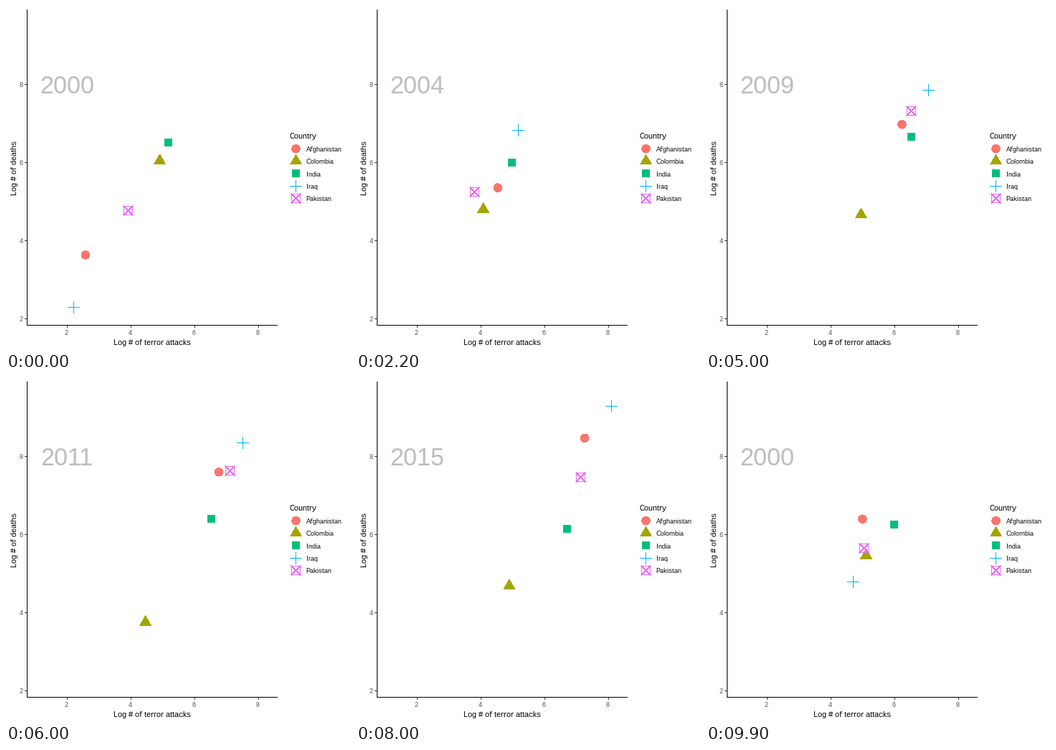
A matplotlib script that plays this animation: 480x480 px, repeating every 10000 ms.

```python
import math

import matplotlib.pyplot as plt
import numpy as np
from matplotlib.animation import FuncAnimation
from matplotlib.patches import PathPatch
from matplotlib.path import Path

SIZE, DPI = 480, 100
FRAMES, INTERVAL = 100, 100
PX = 72 / DPI  # points per pixel
FIRST_YEAR, YEARS = 2000, 19

plt.rcParams.update({
    "font.family": "Liberation Sans",
    "text.hinting": "default",
    "text.hinting_factor": 1,
})

COLORS = {
    "Afghanistan": "#F8766D",
    "Colombia": "#A3A500",
    "India": "#00BF7D",
    "Iraq": "#00B0F6",
    "Pakistan": "#E76BF3",
}

# Turning points: years since the first, log attacks, log deaths
ROUTES = {
    "Afghanistan": [(0, 2.57, 3.63), (3.5, 4.52, 5.35), (5.5, 5.35, 6.25),
                    (9, 6.22, 6.97), (13, 7.28, 8.22), (17, 7.21, 8.71),
                    (18, 7.4, 9.16)],
    "Colombia": [(0, 4.9, 6.04), (3.5, 4.07, 4.8), (5.5, 3.76, 4.66),
                 (7, 3.64, 4.16), (9, 4.94, 4.66), (11, 4.45, 3.75),
                 (13, 4.99, 4.93), (17, 4.78, 4.43), (18, 5.3, 4.88)],
    "India": [(0, 5.17, 6.51), (3.5, 4.965, 5.99), (5.5, 5.03, 6.36),
              (9, 6.52, 6.65), (13, 6.52, 6.15), (17, 6.86, 6.143),
              (18, 6.78, 6)],
    "Iraq": [(0, 2.2, 2.29), (1, 1.1, 2.19), (3.5, 5.16, 6.82),
             (5.5, 6.55, 8.27), (9, 7.05, 7.84), (13, 7.94, 8.86),
             (14, 8.24, 9.53), (17, 7.79, 8.78), (18, 7.18, 7.26)],
    "Pakistan": [(0, 3.91, 4.76), (3.5, 3.79, 5.24), (5.5, 4.74, 5.38),
                 (9, 6.52, 7.31), (13, 7.69, 7.96), (17, 6.57, 6.98),
                 (18, 6.15, 6.55)],
}


def to_x(v):
    return 85.4 + 44.55 * (v - 2)


def to_y(v):
    return 436.2 - 54.5 * (v - 2)


def mid_pixel(v):
    return math.floor(v) + 0.5


def strokes(*lines):
    return Path.make_compound_path(*[Path(line) for line in lines])


def box(h):
    return [(-h, -h), (h, -h), (h, h), (-h, h), (-h, -h)]


R = 5.69
CIRCLE = Path.unit_circle()
SHAPES = {
    "Afghanistan": Path(CIRCLE.vertices * R, CIRCLE.codes),
    "Colombia": Path([(0, -1.555 * R), (1.347 * R, 0.778 * R),
                      (-1.347 * R, 0.778 * R), (0, -1.555 * R)]),
    "India": Path(box(R)),
    "Iraq": strokes([(-8, 0), (8, 0)], [(0, -8), (0, 8)]),
    "Pakistan": strokes(box(6), [(-6, -6), (6, 6)], [(-6, 6), (6, -6)]),
}
OUTLINED = ("Iraq", "Pakistan")


def placed(name, x, y):
    if name in OUTLINED:
        x, y = mid_pixel(x), mid_pixel(y)
    shape = SHAPES[name]
    return Path(shape.vertices + (x, y), shape.codes)


def add_marker(name, x, y):
    if name in OUTLINED:
        style = dict(fill=False, edgecolor=COLORS[name], linewidth=PX,
                     capstyle="projecting", joinstyle="miter")
    else:
        style = dict(facecolor=COLORS[name], linewidth=0)
    return ax.add_patch(PathPatch(placed(name, x, y), zorder=3,
                                  antialiased=False,
                                  snap=name == "India", **style))


def write(x, y, text, size, color="black", **kw):
    return ax.text(x, y, text, fontsize=size * PX, color=color,
                   va="baseline", **kw)


def rule(xs, ys, color):
    ax.plot(xs, ys, color=color, lw=PX, solid_capstyle="butt",
            snap=False, zorder=1)


fig = plt.figure(figsize=(SIZE / DPI, SIZE / DPI), dpi=DPI, facecolor="white")
ax = fig.add_axes([0, 0, 1, 1])
ax.set_xlim(0, SIZE)
ax.set_ylim(SIZE, 0)
ax.axis("off")

# Axes
rule([29.5, 29.5], [5, 446], "black")
rule([29, 379], [445.5, 445.5], "black")
for v in (2, 4, 6, 8):
    tx, ty = mid_pixel(to_x(v)), mid_pixel(to_y(v))
    rule([tx, tx], [446, 449], "#333333")
    rule([26, 29], [ty, ty], "#333333")
    write(tx - 1, 459, str(v), 9, "#4D4D4D", ha="center")
    write(24, ty + 3.5, str(v), 9, "#4D4D4D", ha="right")
write(204, 473, "Log # of terror attacks", 11, ha="center")
write(15, 226, "Log # of deaths", 11, ha="center",
      rotation=90, rotation_mode="anchor")

# Legend
write(396, 185, "Country", 11)
for i, name in enumerate(COLORS):
    y = 199.2 + 17.28 * i
    add_marker(name, 404.6, y)
    write(418.5, round(y + 4), name, 9)

year_text = write(85, 122, "", 35, "#BEBEBE", ha="center", zorder=2)
points = {name: add_marker(name, 0, 0) for name in COLORS}

# Each year holds, then one halfway step leads to the next
STARTS = [5 * i + min(max(i - 1, 0), 5) for i in range(YEARS)] + [FRAMES]


def update(frame):
    now = int(np.searchsorted(STARTS, frame, side="right")) - 1
    halfway = frame == STARTS[now + 1] - 1
    t = now + 0.5 * halfway
    year_text.set_text(str(FIRST_YEAR + (now + halfway) % YEARS))
    for name, point in points.items():
        years, attacks, deaths = zip(*ROUTES[name])
        x = to_x(np.interp(t, years, attacks, period=YEARS))
        y = to_y(np.interp(t, years, deaths, period=YEARS))
        point.set_path(placed(name, x, y))
    return [year_text, *points.values()]


anim = FuncAnimation(fig, update, frames=FRAMES, interval=INTERVAL,
                     repeat=True, repeat_delay=0, blit=False)
plt.show()
```
